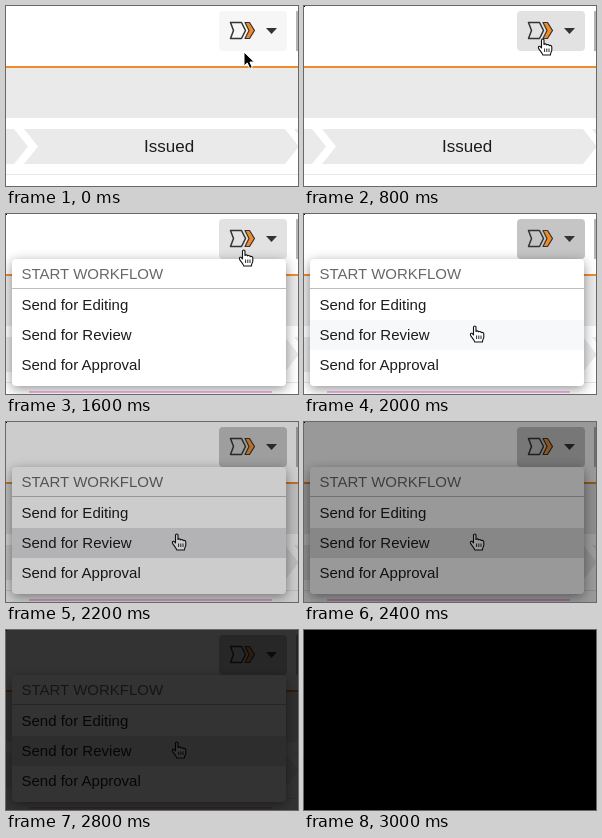
Animation of 292x180 px, one loop 3200 ms. Source, as an HTML page:

```html
<!DOCTYPE html>
<html lang="en">
<head>
<meta charset="utf-8">
<title>Workflow menu</title>
<style>
  html, body { margin: 0; width: 100%; height: 100%; overflow: hidden; background: #fff; }
  svg { display: block; width: 292px; height: 180px; }
  text { font: 15px "Liberation Sans", Arial, sans-serif; fill: #1c1c1c; }
  #panel { filter: drop-shadow(0 3px 6px rgba(0, 0, 0, .42)); }
</style>
</head>
<body>
<svg viewBox="0 0 292 180">
  <rect width="292" height="180" fill="#fff"/>
  <path d="M0 62H292V112H0ZM0 123H8L22 140.500L8 158H0ZM18 123H279L292 139.500V141.500L279 158H18L32 140.500ZM288 123H292V128Z" fill="#eaeaea"/>
  <rect y="60" width="292" height="2" fill="#ef8b2c"/>
  <rect y="168" width="292" height="1" fill="#e6e6e6"/>
  <rect x="290" y="5" width="2" height="40" fill="#b4b4b4"/>
  <text x="138" y="146" style="font-size:17px">Issued</text>

  <rect id="button" x="213" y="5" width="68" height="40" rx="4"/>
  <g stroke="#333" stroke-width="1.500" stroke-linejoin="round">
    <path d="M224.500 16.500H235.500L239.500 24.500L235.500 32.500H224.500L227.500 24.500Z" fill="none"/>
    <path d="M239 16.500H243.500L248.500 24.500L243.500 32.500H239L243 24.500Z" fill="#ef8b2c" stroke-width="1.200"/>
  </g>
  <path d="M260 22H271L265.500 28Z" fill="#333"/>

  <g id="menu">
    <rect x="23" y="177" width="243" height="2" fill="#f3b9e6"/>
    <rect id="panel" x="6" y="45" width="274" height="127" rx="4" fill="#fff"/>
    <rect id="row" x="6" y="106" width="274" height="30"/>
    <rect x="6" y="74" width="274" height="1" fill="#bdbdbd"/>
    <text x="15.500" y="65" style="fill:#686868">START WORKFLOW</text>
    <text x="15.500" y="96">Send for Editing</text>
    <text x="15.500" y="126">Send for Review</text>
    <text x="15.500" y="156">Send for Approval</text>
  </g>

  <rect id="dot" width="1" height="1"/>
  <path id="arrow" d="M0 0V14L3.300 11L5.700 16.500L8.300 15.400L5.900 10H10.300Z" stroke="#fff"/>
  <g id="hand" stroke="#111" stroke-width="1.100" stroke-linejoin="round">
    <path d="M-1.500 9V1.200C-1.500 -.4 1 -.4 1 1.200V5.500C1.500 4.500 3.300 4.600 3.600 6C4.300 5.200 5.900 5.400 6.200 6.700C7 6 8.800 6.500 8.800 8V11C8.800 12.500 7.500 13.500 7.400 16H-.3C-.6 13.800 -4 11 -4.600 8.800C-4.900 7.200 -3 6.700 -2.400 7.900Z" fill="#fff"/>
    <path d="M1.600 9.500V13M3.800 9.500V13M6 9.500V13" stroke-width=".9"/>
  </g>
  <rect id="fade" width="292" height="180"/>
</svg>
<script>
  const LOOP = 3200, STEP = 200;
  const $ = id => document.getElementById(id);
  const show = (id, on) => $(id).setAttribute("visibility", on ? "visible" : "hidden");

  // Pointer stops: start time, shape, tip position
  const stops = [
    [0, "arrow", 238, 46],
    [400, "hand", 239, 33],
    [1600, "hand", 238, 36],
    [1800, "arrow", 232, 53],
    [2000, "hand", 171, 112]
  ];

  function draw(now) {
    const t = Math.floor(now % LOOP / STEP) * STEP;
    const [, shape, x, y] = stops.findLast(stop => stop[0] <= t);
    for (const id of ["arrow", "hand"]) show(id, id === shape);
    $(shape).setAttribute("transform", `translate(${x} ${y})`);

    $("button").setAttribute("fill", t < 600 ? "#f6f6f6" : t < 1800 ? "#e2e2e2" : "#c5c5c5");
    $("row").setAttribute("fill", t < 2000 ? "#fff" : t < 2200 ? "#f7f8fa" : "#e0e0e2");
    show("menu", t >= 1000);
    show("dot", t >= 800);
    $("fade").setAttribute("opacity", Math.min(1, Math.max(0, (t - 2000) / 1000)));
    requestAnimationFrame(draw);
  }

  const start = performance.now();
  requestAnimationFrame(now => draw(Math.max(0, now - start)));
</script>
</body>
</html>
```
